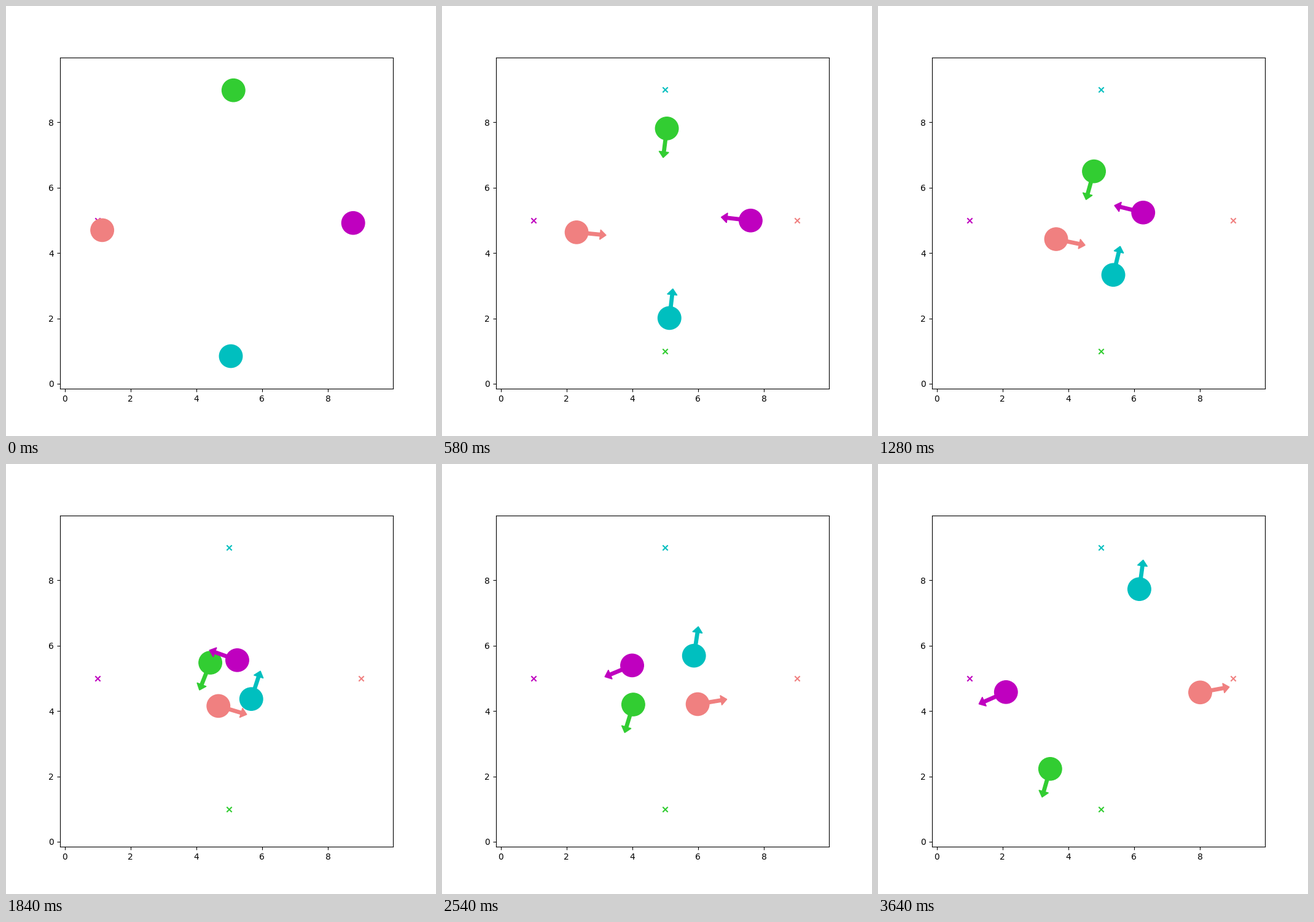
Write a matplotlib script that moves like this. It is 700 px wide and 700 px high and loops after 3.66 s.

```python
import numpy as np
import matplotlib.pyplot as plt
from matplotlib.animation import FuncAnimation
from matplotlib.patches import Circle, Polygon

TICK = 20            # ms
TICKS = 183
LAST_STEP = 78
RADIUS = 0.35
LIMITS = (-0.151, 9.980)
FINAL_BEND = -0.8    # degrees, slight left curve on the second leg

# Unit arrow along +x, scaled to its length and width.
ARROW = np.array([(0, .1), (0, -.1), (.8, -.1), (.8, -.3),
                  (1, 0), (.8, .3), (.8, .1)]) * (0.9, 0.5)

# Colour, goal, start, turning point, end, bend to the right in degrees.
ROBOTS = [
    ("lightcoral", (9, 5), (1.14, 4.70), (5.00, 4.05), (8.01, 4.57), 9),
    ("c", (5, 9), (5.05, 0.845), (5.67, 4.36), (6.16, 7.73), 9),
    ("limegreen", (5, 1), (5.13, 8.98), (4.43, 5.49), (3.45, 2.23), 11),
    ("m", (1, 5), (8.77, 4.92), (4.80, 5.73), (2.105, 4.58), 11),
]


def step_at(tick):
    """Steps come in threes, held for 20, 100 and 20 ms."""
    group, rest = divmod(tick, 7)
    return 3 * group + (rest > 0) + (rest == 6)


def arc(a, b, bend, u):
    """Point at share u of a shallow arc from a to b."""
    dx, dy = b - a
    left = np.array([-dy, dx])
    return a + (b - a) * u + left * np.tan(np.radians(bend)) * u * (1 - u)


def position(start, turn, end, bend, step):
    """Two legs travelled at one constant speed."""
    start, turn, end = map(np.array, (start, turn, end))
    first, second = np.hypot(*(turn - start)), np.hypot(*(end - turn))
    way = step / LAST_STEP * (first + second)
    if way < first:
        return arc(start, turn, bend, way / first)
    return arc(turn, end, FINAL_BEND, (way - first) / second)


fig, ax = plt.subplots(figsize=(7, 7), dpi=100)
ax.set(xlim=LIMITS, ylim=LIMITS)

circles, arrows = [], []
for color, goal, start, *_ in ROBOTS:
    ax.scatter(*goal, marker="x", color=color, zorder=1)
    circles.append(ax.add_patch(Circle(start, RADIUS, color=color, zorder=2)))
    arrows.append(ax.add_patch(Polygon(ARROW, color=color, zorder=3)))


def draw(tick):
    step = step_at(tick)
    for (_, _, *path), circle, arrow in zip(ROBOTS, circles, arrows):
        pos = position(*path, step)
        move = pos - position(*path, step - 1)
        c, s = move / np.hypot(*move)
        circle.center = pos
        arrow.set_xy(ARROW @ np.array([[c, s], [-s, c]]) + pos)
        arrow.set_visible(step > 0)   # at rest on the first step
    return circles + arrows


anim = FuncAnimation(fig, draw, frames=TICKS, interval=TICK,
                     repeat=True, repeat_delay=0, blit=False)
plt.show()
```
